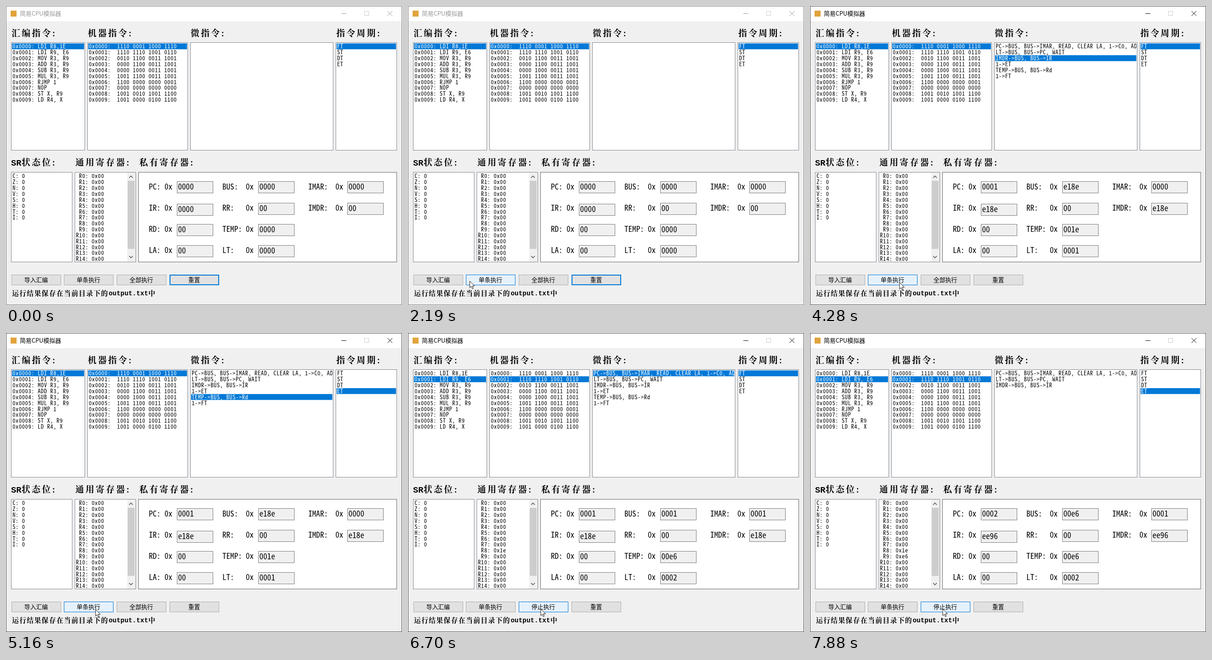
An HTML page with a canvas that plays this animation: 862 px wide and 650 px high, repeating every 8000 ms.

```html
<!DOCTYPE html>
<html lang="zh-CN">
<head>
<meta charset="utf-8">
<title>简易CPU模拟器</title>
<style>
html, body { margin: 0; width: 100%; height: 100%; overflow: hidden; background: #f0f0f0; }
canvas { display: block; }
</style>
</head>
<body>
<canvas id="stage" width="862" height="650"></canvas>
<script>
const ctx = document.getElementById('stage').getContext('2d');
const LOOP = 8000, ROW = 12.85;
const BLUE = '#0078d7', FACE = '#f0f0f0';
const CJK = '"Noto Sans CJK SC", "Noto Sans CJK", "Noto Sans CJK JP", sans-serif';
const KAI = '"Noto Serif CJK SC", ' + CJK;
const NARROW = '"Noto Sans Mono CJK SC", "Noto Sans Mono", monospace';

// Font whose fixed character pitch equals the given advance
function mono(pitch, families, weight = '') {
  ctx.font = `${weight} 100px ${families}`;
  return `${weight} ${pitch / ctx.measureText('0').width * 100}px ${families}`;
}
const LIST_GAP = 0.65;
const LIST = mono(6.85 - LIST_GAP, NARROW);
const FIELD = mono(8.55, NARROW);
const NOTE = mono(8.6, '"Liberation Mono", monospace', 'bold');
const HEAD = mono(11.2, '"Liberation Mono", monospace', 'bold');

const asm = ['LDI R8,1E', 'LDI R9, E6', 'MOV R3, R9', 'ADD R3, R9', 'SUB R3, R9',
  'MUL R3, R9', 'RJMP 1', 'NOP', 'ST X, R9', 'LD R4, X'];
const words = ['e18e', 'ee96', '2c39', '0c39', '0839', '9c39', 'c001', '0000', '929c', '904c'];
const micro = ['PC->BUS, BUS->IMAR, READ, CLEAR LA, 1->C0, ADD, ADD->LT', 'LT->BUS, BUS->PC, WAIT',
  'IMDR->BUS, BUS->IR', '1->ET', 'TEMP->BUS, BUS->Rd', '1->FT'];
const phases = ['FT', 'ST', 'DT', 'ET'];
const flags = [...'CZNVSHTI'].map(c => c + ': 0');

const addr = i => '0x000' + i + ': ';
const bits = w => [...w].map(h => parseInt(h, 16).toString(2).padStart(4, '0')).join(' ');
const asmRows = asm.map((s, i) => addr(i) + s);
const codeRows = words.map((w, i) => addr(i) + ' ' + bits(w));

// name, label x, 0x x, box x, box y, label baseline
const fields = [
  ['PC', 311, 345, 372, 381, 399], ['IR', 311, 345, 372, 430, 445],
  ['RD', 311, 345, 372, 474, 491], ['LA', 311, 345, 372, 520, 537],
  ['BUS', 471, 522, 549, 381, 399], ['RR', 471, 522, 549, 428, 445],
  ['TEMP', 471, 522, 549, 474, 491], ['LT', 471, 522, 549, 520, 537],
  ['IMAR', 658, 717, 743, 381, 399], ['IMDR', 658, 717, 743, 428, 445]
];

const start = {
  active: false, line: 0, phase: 0, rows: 0, sel: -1, focus: 3, press: -1, running: false,
  PC: '0000', IR: '0000', RD: '00', LA: '00', BUS: '0000', RR: '00', TEMP: '0000', LT: '0000',
  IMAR: '0000', IMDR: '00', R8: '00', R9: '00'
};
const events = [
  [3290, { active: true, rows: 1, sel: 0, focus: 1 }],
  [3410, { rows: 6, LT: '0001', TEMP: '001e' }],
  [3840, { sel: 1, PC: '0001', BUS: '0001', IMDR: 'e18e' }],
  [4160, { press: 1 }],
  [4280, { press: -1, sel: 2, BUS: 'e18e', IR: 'e18e' }],
  [4610, { press: 1 }],
  [4710, { press: -1, sel: 3 }],
  [5160, { sel: 4, phase: 3 }],
  [5260, { BUS: '001e', R8: '1e' }],
  [5590, { press: 1 }],
  [5700, { press: -1, sel: 5 }],
  [6470, { running: true, focus: 2, rows: 3, sel: -1 }],
  [6580, { line: 1, phase: 0, rows: 6, sel: 0 }],
  [6690, { BUS: '0001', IMAR: '0001', LT: '0002', TEMP: '00e6' }],
  [6800, { sel: 1, PC: '0002', BUS: '0002', IMDR: 'ee96' }],
  [7010, { sel: 2, BUS: 'ee96', IR: 'ee96' }],
  [7230, { sel: 3 }],
  [7450, { sel: 4, phase: 3, BUS: '00e6', R9: 'e6' }],
  [7660, { sel: 5 }],
  [7880, { rows: 3, sel: -1 }]
];

// Pointer strokes: start time, sampling step, points held until the next sample
const strokes = [
  [310, 111.4, [[761, 643], [703, 633], [612, 621], [520, 611], [438, 603], [368, 604], [308, 611], [266, 616]]],
  [1190, 111.4, [[226, 613], [174, 609], [130, 606], [104, 603], [92, 600], [98, 598], [112, 598], [124, 598]]],
  [2090, 110, [[134, 598], [155, 599], [174, 600], [188, 601], [194.5, 601]]],
  [5810, 110, [[206, 601], [237, 600], [264, 600], [282, 600], [288.5, 600]]]
];

function stateAt(t) {
  const s = { ...start };
  for (const [at, patch] of events) if (t >= at) Object.assign(s, patch);
  return s;
}

function pointerAt(t) {
  let p = null;
  for (const [at, step, pts] of strokes)
    if (t >= at) p = pts[Math.min(pts.length - 1, Math.floor((t - at + 3) / step))];
  return p;
}

function rect(x, y, w, h, fill) {
  ctx.fillStyle = fill;
  ctx.fillRect(x, y, w, h);
}

function box(x, y, r, b, fill, line) {
  rect(x, y, r - x + 1, b - y + 1, line);
  rect(x + 1, y + 1, r - x - 1, b - y - 1, fill);
}

function text(s, x, y, font, color = '#000', spacing = 0, align = 'left') {
  ctx.font = font;
  ctx.fillStyle = color;
  ctx.textAlign = align;
  ctx.letterSpacing = spacing + 'px';
  ctx.fillText(s, x, y);
}

function path(points, color, width = 1) {
  ctx.beginPath();
  for (const [x, y] of points) ctx.lineTo(x, y);
  ctx.strokeStyle = color;
  ctx.lineWidth = width;
  ctx.stroke();
}

function list(x, y, r, b, items, sel = -1, tx = x + 3.2) {
  box(x, y, r, b, '#fff', '#828790');
  ctx.save();
  ctx.beginPath();
  ctx.rect(x + 2, y + 1, r - x - 3, b - y - 1);
  ctx.clip();
  items.forEach((s, i) => {
    if (i === sel) rect(x + 2, y + 2.3 + ROW * i, r - x - 3, 12.8, BLUE);
    text(s, tx, y + 13.4 + ROW * i, LIST, i === sel ? '#fff' : '#000', LIST_GAP);
  });
  ctx.restore();
}

function heading(s, x, y) {
  text(s, x, y, `bold 18.8px ${KAI}`, '#000', 3.4);
}

function titleBar(active) {
  const ink = active ? '#000' : '#999';
  rect(0, 0, 862, 33, '#fff');
  rect(10, 10, 13, 13, '#e0a33c');
  text('简易CPU模拟器', 30, 21, `12.86px ${CJK}`, ink);
  path([[730, 16.5], [741, 16.5]], ink);
  ctx.strokeStyle = '#ccc';
  ctx.strokeRect(780.5, 11.5, 9, 9);
  path([[830.5, 11], [841, 21.5]], ink);
  path([[841, 11], [830.5, 21.5]], ink);
}

function scrollBar() {
  rect(264, 362, 18, 194, FACE);
  rect(265, 380, 15, 148, '#cdcdcd');
  path([[268, 373.5], [272, 369.5], [276, 373.5]], '#505050', 1.5);
  path([[268, 543.5], [272, 547.5], [276, 543.5]], '#505050', 1.5);
}

function button(i, label, s, p) {
  const x = Math.floor(12 + 114.7 * i), r = x + 107;
  const over = p && p[0] >= x && p[0] <= r && p[1] >= 584 && p[1] <= 606;
  if (s.press === i) box(x, 584, r, 606, '#cce4f7', '#005499');
  else if (over) box(x, 584, r, 606, '#e5f1fb', BLUE);
  else if (s.focus === i) {
    rect(x, 584, 108, 23, BLUE);
    rect(x + 2, 586, 104, 19, '#e1e1e1');
  } else box(x, 584, r, 606, '#e1e1e1', '#adadad');
  text(label, x + 53.5, 599.5, `12.86px ${CJK}`, '#000', 0, 'center');
}

function pointer([x, y]) {
  ctx.save();
  ctx.translate(x + 0.5, y);
  ctx.beginPath();
  for (const [a, b] of [[0, 0], [0, 14.4], [3.3, 11.4], [5.6, 16.6], [7.8, 15.6], [5.6, 10.6], [10.2, 10.4]])
    ctx.lineTo(a, b);
  ctx.closePath();
  ctx.fillStyle = '#fff';
  ctx.fill();
  ctx.strokeStyle = '#000';
  ctx.lineWidth = 0.9;
  ctx.stroke();
  ctx.restore();
}

function draw(t) {
  const s = stateAt(t), p = pointerAt(t);
  rect(0, 0, 862, 650, FACE);
  titleBar(s.active);

  heading('汇编指令:', 12, 66);
  heading('机器指令:', 178, 66);
  heading('微指令:', 402, 66);
  heading('指令周期:', 719, 66);
  list(11, 79, 171, 313, asmRows, s.line);
  list(177, 79, 395, 313, codeRows, s.line);
  list(401, 79, 711.6, 313, micro.slice(0, s.rows), s.sel);
  list(717.5, 79, 850, 313, phases, s.phase);

  text('SR', 11, 347, HEAD);
  heading('状态位:', 34, 347);
  heading('通用寄存器:', 151, 347);
  heading('私有寄存器:', 290, 347);
  list(11, 361, 143.6, 556, flags);
  const regs = Array.from({ length: 15 }, (_, i) => ('R' + i).padStart(3) + ': 0x' + (s['R' + i] || '00'));
  list(149.5, 361, 282, 556, regs, -1, 152.2);
  scrollBar();

  box(288, 361, 850, 556, '#fff', '#646464');
  for (const [name, lx, ox, bx, by, base] of fields) {
    text(name + ':', lx, base, FIELD);
    text('0x', ox, base, FIELD);
    box(bx, by, bx + 78, by + 25, FACE, '#7a7a7a');
    text(s[name], bx + 2.5, by + 17.5, FIELD);
  }

  ['导入汇编', '单条执行', s.running ? '停止执行' : '全部执行', '重置'].forEach((label, i) => button(i, label, s, p));

  const small = `bold 14.8px ${KAI}`;
  text('运行结果保存在当前目录下的', 13, 629.5, small, '#000', 1.35);
  text('output.txt', 223.5, 629, NOTE);
  text('中', 310, 629.5, small);

  ctx.strokeStyle = s.active ? '#55524f' : '#8a8783';
  ctx.lineWidth = 1;
  ctx.strokeRect(0.5, 0.5, 861, 649);
  if (p) pointer(p);
}

function frame() {
  draw(performance.now() % LOOP);
  requestAnimationFrame(frame);
}
frame();
</script>
</body>
</html>
```
